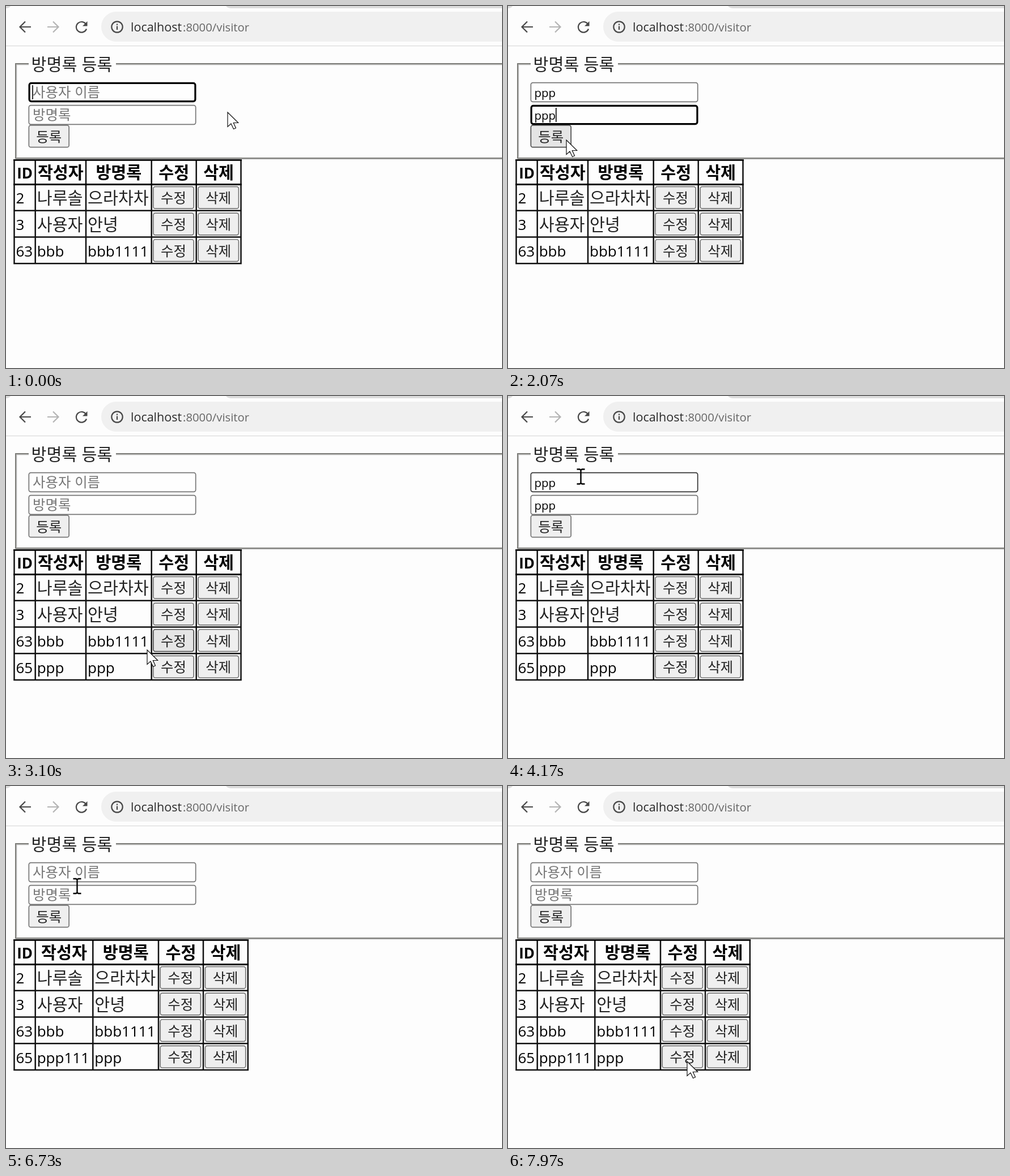
An HTML page that plays this animation: 875 by 640 pixels, repeating every 8000 ms.

```html
<!DOCTYPE html>
<html lang="ko">
<head>
<meta charset="utf-8">
<title>방명록</title>
<style>
  html, body { margin: 0; width: 100%; height: 100%; overflow: hidden; background: #fdfdfd; }
  svg { display: block; position: absolute; left: 0; top: 0; }
  text { font-weight: 400; white-space: pre; }
  .ko { font-family: "Noto Sans CJK KR", "Noto Sans CJK", sans-serif; }
  .latin { font-family: "Open Sans", "Noto Sans", sans-serif; }
  .bold { font-weight: 700; }
</style>
</head>
<body>
<svg width="875" height="640" viewBox="0 0 875 640">
  <g id="toolbar" fill="none" stroke-width="2.2" stroke="#474747">
    <path d="M388 0Q391 4 398 4H875V0ZM0 0H8Q6 4 0 4Z" fill="#dcdcdc" stroke="none"/>
    <rect x="168" y="10" width="760" height="53" rx="26.5" fill="#f0f0f0" stroke="none"/>
    <path d="M0 70.5H875" stroke="#dedede" stroke-width="1.5"/>
    <path d="M44 37H25M34 27.5L24.5 37L34 46.5"/>
    <path d="M73 37H92M83 27.5L92.5 37L83 46.5" stroke="#b4b4b4"/>
    <path d="M141.5 33A9.3 9.3 0 1 0 142 40.5"/>
    <path d="M143.5 27V35.5H135Z" fill="#474747" stroke="none"/>
    <circle cx="196" cy="37" r="9.7"/>
    <path d="M196 35.5V42M196 31.5V33.8"/>
    <g stroke="none" class="latin">
      <text x="220" y="45" font-size="21.5" fill="#2a2a2a">localhost</text>
      <text x="312" y="45" font-size="20.3" fill="#666">:8000/visitor</text>
    </g>
  </g>
  <g fill="none">
    <path d="M40 102H17V269H875M194 102H875" stroke="#7c7c78" stroke-width="2"/>
    <path d="M40 103.7H18.7V267.3M194 103.7H875M17 270.7H875" stroke="#c4c4c4" stroke-width="1.4"/>
  </g>
  <g id="page"></g>
  <g id="pointer">
    <path id="arrow" d="M0 0V25.5L6 20L10.5 29.5L14.5 27.7L10.3 18.5H18.7Z" fill="#fff" stroke="#111" stroke-width="1.2"/>
    <path id="beam" d="M-7 -13H-2L0 -11.5L2 -13H7M0 -12V12M-7 13H-2L0 11.5L2 13H7" fill="none" stroke="#000" stroke-width="2.4"/>
  </g>
</svg>
<script>
const LOOP = 8000;
const HOVER_LAG = 80;
const ROW_STEP = 46.7;
const HEAD_LINE = 315.5;
const $ = id => document.getElementById(id);

// time, x, y
const path = [
  [0, 391, 188], [1300, 391, 188], [1950, 103, 237], [2350, 103, 237],
  [2650, 460, 440], [3100, 249, 449], [3300, 296, 495], [3600, 296, 488],
  [4170, 128.5, 142.5], [4400, 136.5, 150.5], [6350, 136.5, 150.5], [6730, 125.5, 177],
  [6950, 130, 185], [7600, 318, 500], [7880, 318, 500], [7970, 316, 487]
];

// each step changes part of the form or table
const steps = [
  [0, { name: "", note: "", focus: "name", added: false, author: "ppp" }],
  [650, { name: "p" }], [800, { name: "pp" }], [950, { name: "ppp" }],
  [1150, { focus: "note" }],
  [1400, { note: "p" }], [1500, { note: "pp" }], [1600, { note: "ppp" }],
  [2300, { name: "", note: "", focus: "", added: true }],
  [3550, { name: "ppp", note: "ppp" }],
  [4300, { focus: "name" }],
  [4900, { name: "ppp1" }], [5050, { name: "ppp11" }], [5200, { name: "ppp111" }],
  [6690, { name: "", note: "", focus: "", author: "ppp111" }]
];

const fields = [
  { key: "name", y: 135, hint: "사용자 이름" },
  { key: "note", y: 175, hint: "방명록" }
];

function pointerAt(t) {
  const i = path.findIndex(p => p[0] > t);
  if (i < 0) return path[path.length - 1].slice(1);
  if (i === 0) return path[0].slice(1);
  const [a, b] = [path[i - 1], path[i]];
  const u = (t - a[0]) / (b[0] - a[0]);
  const e = u * u * (3 - 2 * u);
  return [a[1] + (b[1] - a[1]) * e, a[2] + (b[2] - a[2]) * e];
}

function stateAt(t) {
  const state = { since: 0 };
  for (const [at, change] of steps)
    if (at <= t) Object.assign(state, change, { since: at });
  return state;
}

const inside = ([px, py], x, y, w, h) => px >= x && px <= x + w && py >= y && py <= y + h;
const isKorean = s => /[가-힣]/.test(s);

// y is the middle of the line
function label(s, x, y, { size, fill, anchor = "start", bold = false } = {}) {
  const ko = isKorean(s);
  const fontSize = size || (ko ? 29.3 : 26);
  const baseline = y + (ko ? fontSize * 0.375 : fontSize * 0.4);
  const color = fill || (ko && !bold ? "#222" : "#000");
  return `<text class="${ko ? "ko" : "latin"}${bold ? " bold" : ""}" x="${x}" y="${baseline}" ` +
    `font-size="${fontSize}" fill="${color}" text-anchor="${anchor}">${s}</text>`;
}

function box(x, y, w, h, fill, stroke, line) {
  return `<rect x="${x + line / 2}" y="${y + line / 2}" width="${w - line}" height="${h - line}" ` +
    `rx="3.5" fill="${fill}" stroke="${stroke}" stroke-width="${line}"/>`;
}

function button(s, x, y, w, mouse) {
  const over = inside(mouse, x, y, w, 40.5);
  return box(x, y, w, 40.5, over ? "#e5e5e5" : "#efefef", over ? "#4f4f4f" : "#767676", 1.7) +
    label(s, x + w / 2, y + 20.7, { size: 24.4, anchor: "middle" });
}

function field({ key, y, hint }, state, mouse, caretOn) {
  const focused = state.focus === key;
  const over = inside(mouse, 40, y, 295, 35);
  const value = state[key];
  const border = focused ? "#000" : over ? "#333" : "#767676";
  let out = box(39.5, y - 0.3, 296, 35.5, "#fefefe", border, focused ? 3.2 : 1.7);
  out += value
    ? label(value, 46.5, y + 18, { size: 20.4 })
    : label(hint, 47, y + 17, { size: 24.4, fill: "#757575" });
  if (focused && caretOn) {
    const digits = value.replace(/\D/g, "").length;
    const x = 47 + (value.length - digits) * 12.6 + digits * 11.6;
    out += `<path d="M${x} ${y + 5}v25" stroke="#000" stroke-width="1.6"/>`;
  }
  return out;
}

function table(state, mouse) {
  const shift = state.author.length > 3 ? 12.3 : 0;
  const cols = [14.5, 51.7, 141 + shift, 256.7 + shift, 335.7 + shift, 414.5 + shift];
  const rows = [["2", "나루솔", "으라차차"], ["3", "사용자", "안녕"], ["63", "bbb", "bbb1111"]];
  if (state.added) rows.push(["65", state.author, "ppp"]);

  const right = cols[5] + 1.3;
  const lineAt = i => HEAD_LINE + ROW_STEP * i - 0.4;
  let grid = "";
  for (const x of cols) grid += `M${x} 271V${lineAt(rows.length) + 1.2}`;
  for (let i = 1; i <= rows.length; i++) grid += `M13.2 ${lineAt(i)}H${right}`;
  let out = `<path d="${grid}" stroke="#111" stroke-width="2.5"/>` +
    `<path d="M13.2 272.3H${right}M13.2 ${HEAD_LINE}H${right}" stroke="#000" stroke-width="2.8"/>`;

  ["ID", "작성자", "방명록", "수정", "삭제"].forEach((s, i) => {
    out += label(s, (cols[i] + cols[i + 1]) / 2, 294.5, { anchor: "middle", bold: true });
  });
  rows.forEach((cells, r) => {
    const y = 339 + ROW_STEP * r;
    cells.forEach((s, c) => { out += label(s, cols[c] + 3, y); });
    out += button("수정", 259 + shift, y - 20.5, 73, mouse);
    out += button("삭제", 338.3 + shift, y - 20.5, 73, mouse);
  });
  return out;
}

let lastMarkup = "";
function render(t) {
  const state = stateAt(t);
  const mouse = pointerAt(Math.max(0, t - HOVER_LAG));
  const caretOn = Math.floor((t - state.since) / 530) % 2 === 0;
  const markup = label("방명록 등록", 44.5, 103.5) +
    fields.map(f => field(f, state, mouse, caretOn)).join("") +
    button("등록", 39.5, 210, 72.5, mouse) + table(state, mouse);
  if (markup !== lastMarkup) $("page").innerHTML = lastMarkup = markup;

  const tip = pointerAt(t);
  const overText = inside(tip, 40, 135, 295, 75);
  $("pointer").setAttribute("transform", `translate(${tip})`);
  $("arrow").style.display = overText ? "none" : "";
  $("beam").style.display = overText ? "" : "none";
}

const start = performance.now();
function tick() {
  render((performance.now() - start) % LOOP);
  requestAnimationFrame(tick);
}
tick();
</script>
</body>
</html>
```
